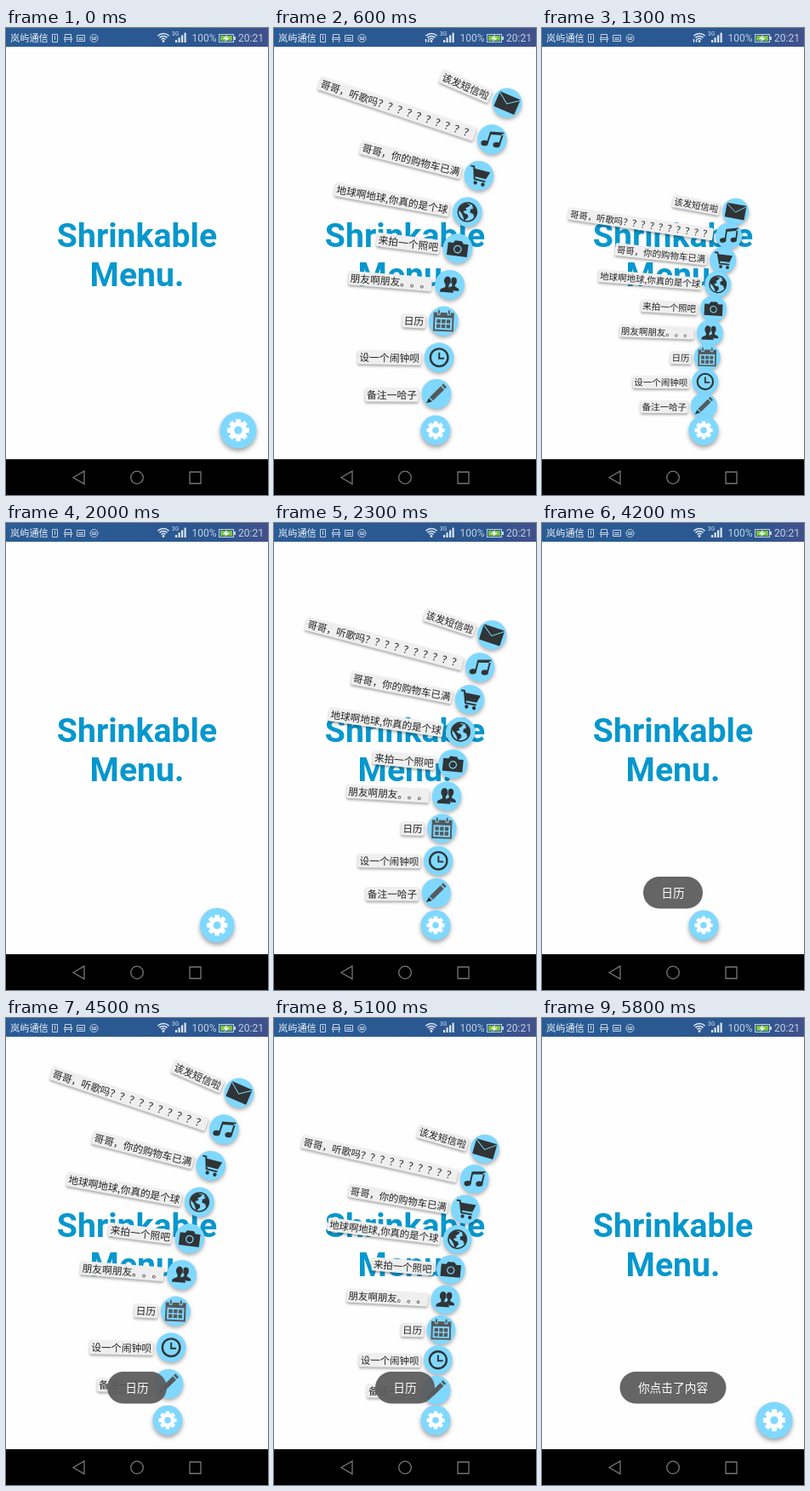
Recreate the animation shown at these times as an HTML page with a canvas. Size 308 by 548 pixels, loop 6400 ms.

```html
<!DOCTYPE html>
<html lang="zh-CN">
<head>
<meta charset="utf-8">
<title>Shrinkable Menu</title>
<style>
html, body { margin: 0; width: 100%; height: 100%; overflow: hidden; background: #fff; }
canvas { display: block; }
</style>
</head>
<body>
<canvas id="stage" width="308" height="548"></canvas>
<script>
const ctx = document.getElementById('stage').getContext('2d');
const CJK = '"Noto Sans CJK SC", "Noto Sans CJK JP", "Noto Sans CJK", sans-serif';
const BLUE = '#80d8ff', DARK = '#303436', GREY = '#55595c';
const LOOP = 6400, STEP = 100, TAU = Math.PI * 2;
const HOME_X = 273, OPEN_X = 190, BASE_Y = 472;

// Times in ms: slide out, spread, close, collapsed, back home
const cycles = [
  [70, 230, 1144, 1415, 1650],
  [1941, 2101, 3100, 3225, 3480],
  [4100, 4200, 5038, 5188, 5300]
];
const SPREAD = 300;

const ramp = (t, a, b) => Math.min(1, Math.max(0, (t - a) / (b - a)));
const smooth = u => (1 - Math.cos(Math.PI * u)) / 2;

function pose(t) {
  let slide = 0, spread = 0;
  for (const [out, open, close, shut, home] of cycles) {
    slide += smooth(ramp(t, out, open)) - smooth(ramp(t, shut, home));
    spread += 1 - (1 - ramp(t, open, open + SPREAD)) ** 2 - ramp(t, close, shut) ** 2;
  }
  return { x: HOME_X + (OPEN_X - HOME_X) * slide, spread };
}

function at(x, y, draw, angle = 0, scale = 1) {
  ctx.save();
  ctx.translate(x, y);
  ctx.rotate(angle);
  ctx.scale(scale, scale);
  draw();
  ctx.restore();
}
function fill(color, d) {
  ctx.fillStyle = color;
  ctx.fill(new Path2D(d), 'evenodd');
}
function line(color, width, d) {
  ctx.strokeStyle = color;
  ctx.lineWidth = width;
  ctx.stroke(new Path2D(d));
}
function disc(x, y, r, color) {
  ctx.fillStyle = color;
  ctx.beginPath();
  ctx.arc(x, y, r, 0, TAU);
  ctx.fill();
}
function ring(x, y, r, color, width) {
  ctx.strokeStyle = color;
  ctx.lineWidth = width;
  ctx.beginPath();
  ctx.arc(x, y, r, 0, TAU);
  ctx.stroke();
}
function box(x, y, w, h, r, color) {
  ctx.fillStyle = color;
  ctx.beginPath();
  ctx.roundRect(x, y, w, h, r);
  ctx.fill();
}
function text(str, x, y, font, color, align = 'center') {
  ctx.font = font;
  ctx.fillStyle = color;
  ctx.textAlign = align;
  ctx.fillText(str, x, y);
}
function shadowed(blur, y, alpha, draw) {
  ctx.save();
  ctx.shadowColor = `rgba(0,0,0,${alpha})`;
  ctx.shadowBlur = blur;
  ctx.shadowOffsetY = y;
  draw();
  ctx.restore();
}

const icons = {
  pencil() {
    fill(GREY, 'M-8 4L5 -9L9 -5L-4 8ZM6 -10L8 -12L12 -8L10 -6Z');
    fill(DARK, 'M-9 5L-5 9L-12 11Z');
  },
  clock() {
    ring(0, 0, 10.3, DARK, 2.4);
    line(DARK, 2, 'M0 -6V1H6');
  },
  calendar() {
    fill(GREY, 'M-12 -10H12V12H-12ZM-10 -4V10H10V-4Z');
    for (let i = 0; i < 6; i++) box(-8 + i % 3 * 5.8, -2 + (i / 3 | 0) * 5.8, 4.4, 4.4, 0, GREY);
    for (const x of [-7, 5]) {
      box(x - 1, -13, 4, 6, 1, BLUE);
      box(x, -13, 2, 5, 1, GREY);
    }
  },
  people() {
    const person = color => {
      ctx.fillStyle = color;
      ctx.beginPath();
      ctx.ellipse(0, -4.5, 4, 5.2, 0, 0, TAU);
      ctx.fill();
      fill(color, 'M-2 -1H2V3L7 5.5Q8 6.5 8 9H-8Q-8 6.5 -7 5.5L-2 3Z');
    };
    at(4.5, -1, () => person(DARK), 0, .85);
    at(-3, 0, () => person(BLUE), 0, 1.12);
    at(-3, 0, () => person(DARK));
  },
  camera() {
    fill(DARK, 'M-12 -6H-6L-4 -9H4L6 -6H12V9H-12Z');
    ring(0, 1, 4.2, BLUE, 1.2);
  },
  globe() {
    ring(0, 0, 11, DARK, 1.6);
    fill(DARK, 'M-10 -5L-4 -10L2 -9L0 -6L-3 -4L-1 -2L-5 0L-3 2L1 3L2 6L-2 11L-4 6L-7 2L-10 0Z' +
      'M4 -9L10 -5L11 1L9 5L7 1L3 0L3 -4L6 -5Z');
  },
  cart() {
    line(DARK, 2, 'M-12 -9H-8L-4 5H9');
    fill(DARK, 'M-8 -7H12L9 2H-5Z');
    disc(-2, 9, 2.2, DARK);
    disc(7, 9, 2.2, DARK);
  },
  music() {
    fill(DARK, 'M-5 -8L11 -12V-8.5L-3 -5V7H-5ZM9 -10H11V4H9Z');
    for (const [x, y] of [[-7, 7], [7, 4.5]]) {
      ctx.beginPath();
      ctx.ellipse(x, y, 4.2, 3.2, -.3, 0, TAU);
      ctx.fill();
    }
  },
  mail() {
    box(-13, -9.5, 26, 19, 1, DARK);
    line(BLUE, 1, 'M-13 -8.5L0 1L13 -8.5');
  }
};

const items = [
  ['pencil', '备注一哈子'],
  ['clock', '设一个闹钟呗'],
  ['calendar', '日历'],
  ['people', '朋友啊朋友。。。'],
  ['camera', '来拍一个照吧'],
  ['globe', '地球啊地球,你真的是个球'],
  ['cart', '哥哥，你的购物车已满'],
  ['music', '哥哥，听歌吗' + '？'.repeat(10)],
  ['mail', '该发短信啦']
];

// Glyphs are placed singly so that punctuation keeps its full width
function tag(label) {
  const font = ctx.font = `11.8px ${CJK}`;
  const glyphs = [...label].map(c => [c, ctx.measureText(c).width]);
  const w = glyphs.reduce((sum, [, advance]) => sum + advance, 4);
  shadowed(3, 2, .32, () => box(-21 - w, -7, w, 16.5, 2, '#efefef'));
  let x = -19 - w;
  for (const [c, advance] of glyphs) {
    text(c, x, 5.9, font, '#222', 'left');
    x += advance;
  }
}

function menuItem([icon, label], rank, spread) {
  const rise = 42.67 * rank * spread;
  const bend = rise * rise / 1755;
  const scale = 1 - (1 - spread) ** 2;
  at(OPEN_X + bend, BASE_Y - rise, () => {
    tag(label);
    shadowed(4, 2.5, .3, () => disc(0, 0, 17.4, BLUE));
    icons[icon]();
  }, bend * .278 * Math.PI / 180, scale);
}

function gearButton(x) {
  const r = 17.5 + 4 * (x - OPEN_X) / (HOME_X - OPEN_X);
  at(x, BASE_Y, () => {
    shadowed(5, 3, .35, () => disc(0, 0, 21.5, BLUE));
    disc(0, 0, 10, '#fff');
    for (let i = 0; i < 8; i++) at(0, 0, () => box(-2.9, -13, 5.8, 8, 1.2, '#fff'), i * TAU / 8);
    disc(0, 0, 4.7, BLUE);
  }, 0, r / 21.5);
}

function toast(str, w, alpha) {
  if (alpha <= 0) return;
  ctx.save();
  ctx.globalAlpha = alpha;
  box(154 - w / 2, 415, w, 37.5, 18.7, 'rgba(90,90,90,.93)');
  text(str, 154, 439, `13.7px ${CJK}`, '#fff');
  ctx.restore();
}

function statusBar(busy) {
  const pale = '#c3d0e0', bright = '#dce5ef';
  const sky = ctx.createLinearGradient(0, 0, 308, 0);
  sky.addColorStop(0, '#2a5c95');
  sky.addColorStop(.8, '#2c5790');
  sky.addColorStop(1, '#42508c');
  ctx.fillStyle = sky;
  ctx.fillRect(0, 0, 308, 22);
  text('岚屿通信', 5, 16, `11.2px ${CJK}`, '#f0f4f8', 'left');
  line(pale, 1, 'M54.5 7.5H60.5V16.5H54.5ZM57.5 9V14M69.5 11V7.5H76.5V11M68.5 11.5H77.5V13.5H68.5ZM69.5 14V17M76.5 14V17' +
    'M83.5 8.5H92.5V15.5H83.5ZM85 11.5H91M85 13.5H91');
  ring(103.5, 12, 4.5, pale, 1);
  line(pale, 1, 'M101.5 10V13.5H105.5V10M103.5 10V13');
  for (const r of [3.5, 6.5, 9.5]) {
    ctx.strokeStyle = bright;
    ctx.lineWidth = 1.5;
    ctx.beginPath();
    ctx.arc(185, 16, r, -2.35, -.8);
    ctx.stroke();
  }
  disc(185, 15.5, 1.4, bright);
  if (busy) fill(bright, 'M177 14.5L178.5 12.5L180 14.5ZM178 14.5H179V17H178ZM180 15H183L181.5 17ZM181 12.5H182V15H181Z');
  text('3G', 195, 9, '6.5px Roboto, sans-serif', bright, 'left');
  for (let i = 0; i < 4; i++) box(199 + i * 3.5, 14 - i * 2.8, 2.2, 3 + i * 2.8, 0, bright);
  text('100%', 218.5, 16.3, '12px Roboto, sans-serif', pale, 'left');
  ctx.strokeStyle = pale;
  ctx.lineWidth = 1;
  ctx.strokeRect(250.5, 7.5, 17, 9);
  box(268, 10, 2, 4, 0, pale);
  box(252, 9, 14, 6, 0, '#75c443');
  fill('#fff', 'M260 8L255 13H258.5L257 16L263 11.5H259Z');
  text('20:21', 303, 16.3, '12px Roboto, sans-serif', pale, 'right');
}

function navBar() {
  box(0, 506, 308, 42, 0, '#000');
  line('#777', 1.3, 'M79 527.5L92 520V535ZM216 521H229V534.5H216Z');
  ring(154, 527.5, 7.3, '#777', 1.3);
}

function render(t) {
  const { x, spread } = pose(t);
  box(0, 0, 308, 548, 0, '#fefefe');
  text('Shrinkable', 154, 257, 'bold 39.2px Roboto, sans-serif', '#0797cd');
  text('Menu.', 154, 303, 'bold 39.2px Roboto, sans-serif', '#0797cd');
  if (spread > .01) {
    for (let i = items.length; i > 0; i--) menuItem(items[i - 1], i, spread);
  }
  gearButton(x);
  statusBar(t >= 300 && t < 1600);
  navBar();
  toast('日历', 70, ramp(t, 3400, 3600) - ramp(t, 5400, 5600));
  toast('你点击了内容', 125, ramp(t, 5600, 5800));
}

function tick() {
  const t = performance.now() % LOOP;
  render(Math.floor(t / STEP) * STEP);
  requestAnimationFrame(tick);
}
tick();
</script>
</body>
</html>
```
